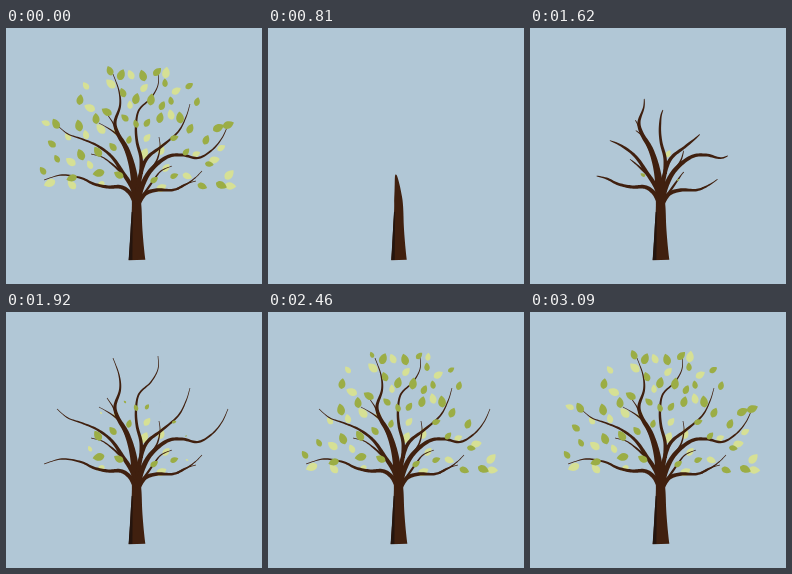
Recreate the animation shown at these times as an HTML page. Size 256 by 256 pixels, loop 3120 ms.

```html
<!DOCTYPE html>
<html lang="en">
<head>
<meta charset="utf-8">
<title>Growing tree</title>
<style>
html, body { margin: 0; width: 100%; height: 100%; overflow: hidden; background: #b1c7d6; }
svg { display: block; width: 100%; height: 100%; }
</style>
</head>
<body>
<svg id="stage" viewBox="0 0 256 256">
  <g id="back" fill="#d6e095"></g>
  <g id="wood" fill="#40200f"></g>
  <path id="shade" fill="#25150e"></path>
  <g id="front" fill="#9bad45"></g>
</svg>
<script>
const LOOP = 3120, STEP = 30;
const $ = id => document.getElementById(id);
const clamp = v => Math.max(0, Math.min(1, v));

function addPath(parent) {
  const p = document.createElementNS('http://www.w3.org/2000/svg', 'path');
  parent.appendChild(p);
  return p;
}

const pairs = text => text.split(' ').map(p => p.split(',').map(Number));

// Catmull-Rom curve sampled with its running length
function sampleCurve(pts) {
  const out = [];
  const at = i => pts[Math.max(0, Math.min(pts.length - 1, i))];
  for (let i = 0; i < pts.length - 1; i++) {
    for (let j = 0; j < 10; j++) out.push(spline(at(i - 1), at(i), at(i + 1), at(i + 2), j / 10));
  }
  out.push(pts[pts.length - 1].slice());
  let len = 0;
  return out.map(([x, y], i) => {
    if (i) len += Math.hypot(x - out[i - 1][0], y - out[i - 1][1]);
    return { x, y, s: len };
  });
}

function spline(a, b, c, d, t) {
  return [0, 1].map(k => 0.5 * (2 * b[k] + (c[k] - a[k]) * t +
    (2 * a[k] - 5 * b[k] + 4 * c[k] - d[k]) * t * t +
    (3 * b[k] - a[k] - 3 * c[k] + d[k]) * t * t * t));
}

// Outline of a tapering limb grown to a given length
function limbOutline(curve, grown, width) {
  if (grown <= 0.5) return '';
  const left = [], right = [];
  for (let i = 0; i < curve.length; i++) {
    const p = curve[i], q = curve[Math.min(i + 1, curve.length - 1)], o = curve[Math.max(i - 1, 0)];
    let { x, y, s } = p;
    const end = s >= grown;
    if (end && i) {
      const f = (grown - o.s) / (s - o.s);
      x = o.x + (x - o.x) * f;
      y = o.y + (y - o.y) * f;
      s = grown;
    }
    const dx = q.x - o.x, dy = q.y - o.y, d = Math.hypot(dx, dy) || 1;
    const h = width(s) / 2;
    left.push([x + dy / d * h, y - dx / d * h]);
    right.unshift([x - dy / d * h, y + dx / d * h]);
    if (end) break;
  }
  return 'M' + left.concat(right).map(p => p.map(v => v.toFixed(2)).join()).join('L') + 'Z';
}

const limb = (points, width, start, end) => {
  const curve = sampleCurve(pairs(points));
  return { curve, width, start, end, length: curve[curve.length - 1].s, el: addPath($('wood')) };
};

const stem = limb('131,232 130.5,200 130.5,175 127.5,145 121,122 112,106 109,94 114,78 113,63 107,46', 13, 30, 1860);
const branches = [
  limb('131,172 126,159 117,145 106,129 92,118 76,111 62,106 51,97', 4.6, 960, 1890),
  limb('129,174 124,165 115,159 102,159 88,156 75,150 56,147 38,152', 4.2, 960, 1890),
  limb('131,174 133,154 137,138 143,128 156,118 172,104 180,89 184,76', 4.8, 960, 1890),
  limb('131,176 136,158 145,142 161,129 176,127 192,130 206,122 216,110 222,97', 5.4, 900, 1920),
  limb('132,176 139,166 151,162 167,162 179,157 189,150 196,143', 4.2, 960, 1740),
  limb('135,146 135,130 131,114 130,98 133,82 145,70 152,57 152,44', 3.2, 1230, 1890),
  limb('121,124 114,110 105,102 93,95', 2.2, 1350, 1770),
  limb('111,104 107,95 101,86', 1.6, 1410, 1740),
  limb('118,147 106,136 96,129 85,126', 2, 1350, 1800),
  limb('138,166 147,153 155,143 166,138', 2, 1380, 1740),
  limb('171,161 180,156 190,153', 1.6, 1560, 1860),
  limb('143,145 151,132 154,119 153,109', 1.8, 1350, 1770)
];

const tip = (grown, s, span) => Math.sqrt(clamp((grown - s) / span));

function drawStem(t) {
  const grown = t < 270 ? 36 * clamp((t - 30) / 240)
    : t < 1260 ? 36 + 91 * (t - 270) / 990
    : 127 + (stem.length - 127) * clamp((t - 1260) / 600);
  const scale = Math.min(1, grown / 92);
  const width = s => 0.7 * scale + scale * tip(grown, s, 25) *
    (13 * Math.pow(clamp(1 - s / stem.length), 1.25) + 3 * Math.exp(-s / 20));
  stem.el.setAttribute('d', limbOutline(stem.curve, grown, width));

  const h = Math.min(48, grown * 0.65), w = width(0) / 2;
  $('shade').setAttribute('d', grown > 1
    ? `M${131 - w},232L${130.7 - width(h) / 2},${232 - h}L${131.8 - width(h) / 2},${232 - h}L${131 - w * 0.55},232Z` : '');
}

function drawBranch(b, t) {
  const k = clamp((t - b.start) / (b.end - b.start)), grown = b.length * k;
  const scale = Math.min(1, 0.55 + k);
  b.el.setAttribute('d', limbOutline(b.curve, grown, s =>
    0.65 + b.width * scale * Math.pow(clamp(1 - s / b.length), 1.15) * tip(grown, s, 14)));
}

const darkSpots = '104,43 115,47 137,48 151,44 183,58 159,55 117,65 130,71 145,72 74,72 191,74 165,73 156,78 ' +
  '101,84 73,98 90,91 119,90 130,96 141,95 154,90 174,90 50,96 46,116 51,131 37,143 66,150 75,127 92,124 ' +
  '107,119 123,112 168,110 184,101 212,100 222,97 200,112 203,136 180,124 196,158 215,157 93,145 113,147 148,152 168,148';
const lightSpots = '125,47 160,45 105,56 170,63 80,58 124,77 138,60 84,80 95,101 165,87 40,95 62,109 ' +
  '80,107 65,134 44,155 66,157 84,137 110,103 141,110 155,122 138,126 155,160 160,140 ' +
  '190,126 215,120 208,132 223,147 224,158 181,148 95,156';

function makeLeaves(spots, parent, size) {
  return pairs(spots).map(([x, y], i) => {
    const dx = x - 130, dy = y - 140;
    const jitter = Math.sin(i * 12.9 + x) * 38;
    const outerTop = Math.abs(dx) > 70 && y < 125;
    const el = addPath(parent);
    el.setAttribute('d', 'M0 6C-6 4-5-3 0-7C5-3 6 4 0 6Z');
    return {
      el, x, y,
      angle: Math.atan2(dx, -dy) * 57.3 * 0.75 + jitter,
      size: size * (0.9 + 0.16 * Math.sin(i * 7.3)),
      start: outerTop ? 2400 + Math.abs(dx) * 1.2 : 1360 + Math.hypot(dx, dy) * 10
    };
  });
}

const leaves = makeLeaves(lightSpots, $('back'), 0.88)
  .concat(makeLeaves(darkSpots, $('front'), 0.88));

function drawLeaf(leaf, t) {
  const k = leaf.size * clamp((t - leaf.start) / 150);
  leaf.el.setAttribute('transform', `translate(${leaf.x} ${leaf.y}) rotate(${leaf.angle}) scale(${k})`);
  leaf.el.setAttribute('visibility', k > 0 ? 'visible' : 'hidden');
}

function render(ms) {
  const tick = Math.floor((ms % LOOP) / STEP) * STEP;
  const t = tick < STEP ? LOOP : tick; // the loop opens on the full tree
  drawStem(t);
  branches.forEach(b => drawBranch(b, t));
  leaves.forEach(leaf => drawLeaf(leaf, t));
}

const began = performance.now();
function frame() {
  render(performance.now() - began);
  requestAnimationFrame(frame);
}
frame();
</script>
</body>
</html>
```
